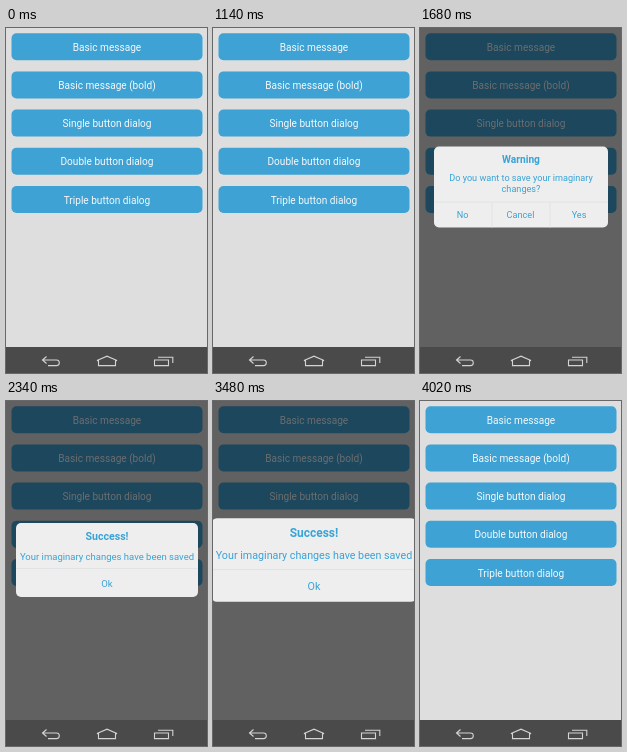
Animation of 201 by 345 pixels, one loop 4080 ms. Source, as an HTML page:

```html
<!DOCTYPE html>
<html lang="en">
<head>
<meta charset="utf-8">
<title>Dialog demo</title>
<style>
  html, body { margin: 0; width: 100%; height: 100%; overflow: hidden; background: #dedede; }
  svg { display: block; width: 100%; height: 100%; }
  text { font-family: Roboto, sans-serif; text-anchor: middle; }
  .button rect { fill: #3fa2d4; }
  .button text { fill: #f4f8fa; font-size: 10.1px; }
  .dialog text { fill: #38a3d6; }
  .dialog .title { font-weight: bold; }
  .dialog path { stroke: #dcdfe0; stroke-width: .7; }
  .nav path { fill: none; stroke: #d4d4d4; stroke-width: 1.1; }
</style>
</head>
<body>
<svg viewBox="0 0 201 345">
  <rect width="201" height="345" fill="#dedede"/>
  <g id="buttons" class="button"></g>
  <rect id="dim" width="201" height="319" opacity="0"/>
  <g class="nav">
    <rect y="319" width="201" height="26" fill="#4a4a4a"/>
    <path d="M40.5 328.5 36.5 332 40.5 335.5M36.5 332H50.5a2.8 2.8 0 0 1 0 5.6H42"/>
    <path d="M91 332.6 101 328.2 111 332.6H109.5V337.6H92.5V332.6Z"/>
    <path d="M148.5 332H162.5V337.6H148.5ZM152 329.2H166.8V335"/>
  </g>
  <g id="warning" class="dialog">
    <rect x="14" y="118.5" width="174" height="81" rx="5" fill="#eee"/>
    <path d="M14 174H188M72 174V199.5M130 174V199.5"/>
    <text class="title" x="101" y="135" font-size="10.2">Warning</text>
    <g font-size="9.14">
      <text x="101" y="153">Do you want to save your imaginary</text>
      <text x="101" y="164">changes?</text>
      <text x="42.5" y="190">No</text>
      <text x="100.5" y="190">Cancel</text>
      <text x="159" y="190">Yes</text>
    </g>
  </g>
  <g id="success" class="dialog">
    <rect x="10" y="122" width="182" height="74" rx="5" fill="#eee"/>
    <path d="M10 167.5H192"/>
    <text class="title" x="101" y="139" font-size="10.6">Success!</text>
    <g font-size="9.5">
      <text x="101" y="158.5">Your imaginary changes have been saved</text>
      <text x="101" y="185.5">Ok</text>
    </g>
  </g>
</svg>
<script>
const LOOP = 4080, OPEN = 1145, OPEN_TIME = 258, SWAP = 2340, CLOSE = 3340, CLOSE_TIME = 350;
const DIM = 0.56;
const byId = id => document.getElementById(id);
const clamp = v => Math.min(1, Math.max(0, v));

byId('buttons').innerHTML = ['Basic message', 'Basic message (bold)', 'Single button dialog',
  'Double button dialog', 'Triple button dialog'].map((label, i) => `
  <g transform="translate(0 ${5.2 + i * 38.2})">
    <rect x="5.5" width="191" height="27" rx="5"/>
    <text x="101" y="17.6">${label}</text>
  </g>`).join('');

// Grows past full size before settling; closing starts with the mirrored swell.
const anticipate = t => t * t * (3 * t - 2);
const overshoot = t => 1 - anticipate(1 - t);

function place(id, scale) {
  const dialog = byId(id);
  dialog.setAttribute('visibility', scale > 0.01 ? 'visible' : 'hidden');
  dialog.setAttribute('transform', `translate(101 159) scale(${Math.max(scale, 0.01)}) translate(-101 -159)`);
}

function draw(now) {
  const t = now % LOOP;
  place('warning', t < SWAP ? overshoot(clamp((t - OPEN) / OPEN_TIME)) : 0);
  place('success', t < SWAP ? 0 : 1 - anticipate(clamp((t - CLOSE) / CLOSE_TIME)));
  const fadeIn = clamp((t - OPEN) / 200);
  const fadeOut = clamp((t - CLOSE - CLOSE_TIME) / 150);
  byId('dim').setAttribute('opacity', DIM * (fadeIn - fadeOut));
}

const start = performance.now();
function tick() {
  draw(performance.now() - start);
  requestAnimationFrame(tick);
}
tick();
</script>
</body>
</html>
```
